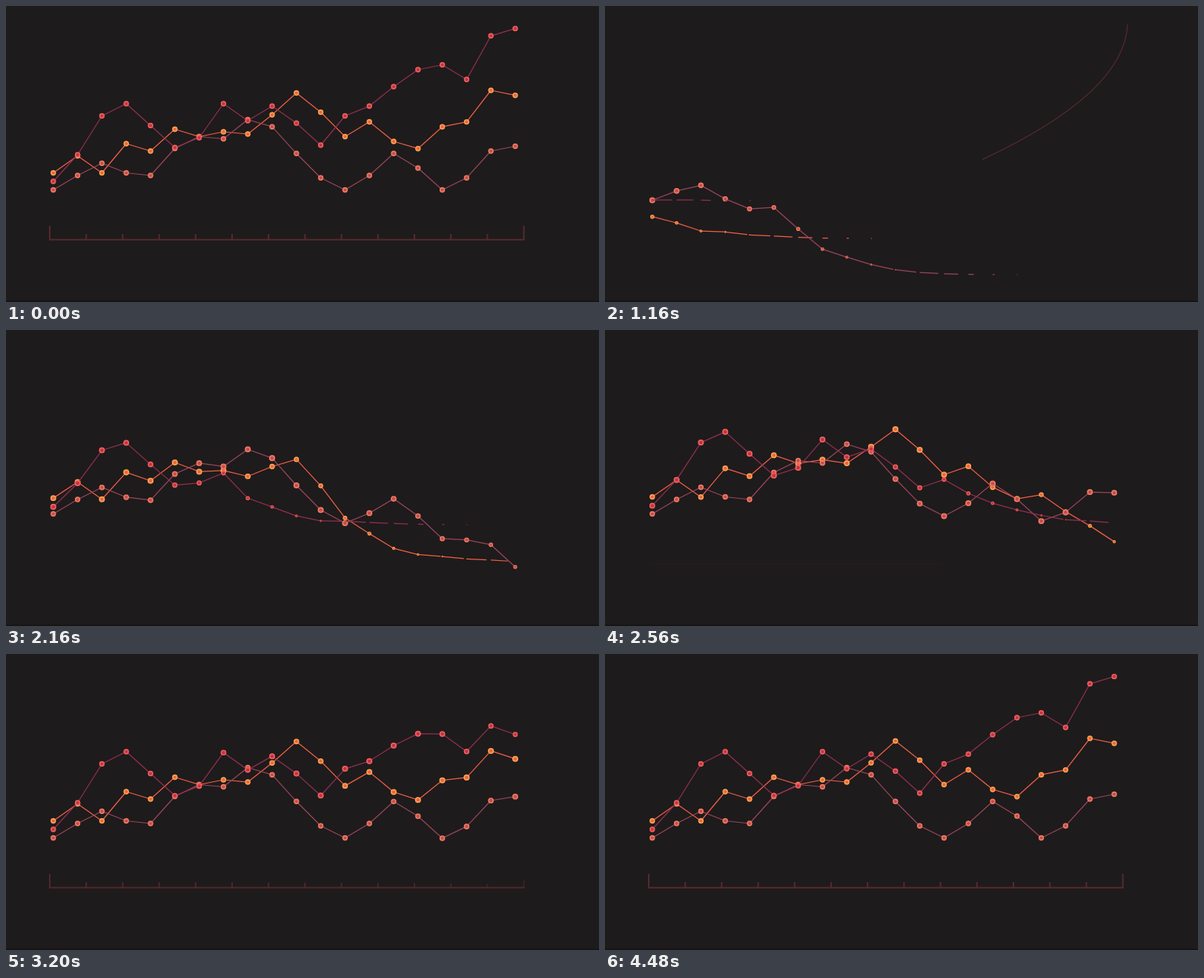
Write an HTML page that moves like this. It is 800 px wide and 400 px high and loops after 5.52 s.

```html
<!DOCTYPE html>
<html lang="en">
<head>
<meta charset="utf-8">
<title>Line chart</title>
<style>
html, body { margin: 0; width: 100%; height: 100%; overflow: hidden; background: #1e1b1c; }
svg { display: block; width: 100%; height: 100%; }
</style>
</head>
<body>
<svg id="stage" viewBox="0 0 800 400" fill="none"></svg>
<script>
const LOOP = 5520, START = 40, END = 4480;
const STEP = 80;              // delay between neighbouring points
const X0 = 63.8, DX = 32.8;
const AXIS = { x: 59, y: 315.8, w: 639.6, parts: 13, color: '#552a2f' };

const SERIES = [
  { delay: 480, base: 314, line: '#f25f47', ring: '#f9a352', core: '#f2623f',
    y: [225.5, 202.5, 225.5, 186, 196, 166.5, 176.5, 170, 173, 147,
        117.5, 143.5, 176.5, 156.5, 183, 192.7, 163.2, 156.6, 114, 120.7] },
  { delay: 0, base: 363, line: '#9a465a', ring: '#ee7b62', core: '#c44c4e',
    y: [248.5, 229, 212.5, 225.5, 229, 192.5, 176.5, 179.5, 153.5, 163.2,
        199.3, 232.2, 248.5, 229, 199.3, 219, 248.5, 232.2, 196, 189.5] },
  { delay: 840, base: 263, line: '#91304f', ring: '#ee605f', core: '#c4323f',
    y: [237, 201, 148.5, 132, 161.5, 191.3, 178, 132, 155, 135.3,
        158.3, 188, 148.5, 135.3, 109, 86, 79.5, 99.3, 40.3, 30.4] }
];

const clamp = v => Math.min(1, Math.max(0, v));
const span = (t, from, length) => clamp((t - from) / length);
const cubicOut = x => 1 - (1 - x) ** 3;
const quadInOut = x => x < 0.5 ? 2 * x * x : 1 - 2 * (1 - x) ** 2;

// cubic-bezier(.6, 0, 0, 1)
function swift(x) {
  if (x <= 0 || x >= 1) return clamp(x);
  let lo = 0, hi = 1;
  for (let i = 0; i < 22; i++) {
    const s = (lo + hi) / 2;
    if (s * (1.8 + s * (2.8 * s - 3.6)) < x) lo = s; else hi = s;
  }
  return lo * lo * (3 - 2 * lo);
}

function backOut(x) {
  const q = x - 1;
  return 1 + 2.7 * q ** 3 + 1.7 * q * q;
}

const stage = document.getElementById('stage');

function add(tag, attrs) {
  const el = document.createElementNS('http://www.w3.org/2000/svg', tag);
  set(el, attrs);
  return stage.appendChild(el);
}

function set(el, attrs) {
  for (const key in attrs) el.setAttribute(key, attrs[key]);
}

add('rect', { width: 800, height: 400, fill: '#1e1b1c' });
add('rect', { y: 398, width: 800, height: 2, fill: '#171415' });

const swoosh = add('path', {
  d: 'M59 355 Q705 193 705 21', pathLength: 1, stroke: '#592a2e', 'stroke-width': 1.2
});
const axis = add('path', { stroke: AXIS.color, 'stroke-width': 2 });
const ticks = Array.from({ length: AXIS.parts + 1 }, () =>
  add('path', { stroke: AXIS.color, 'stroke-width': 2 }));

for (const s of SERIES) {
  s.path = add('path', { stroke: s.line, 'stroke-width': 1.25 });
  s.dots = s.y.map(() => add('circle', { fill: s.core, stroke: s.ring }));
}

function drawSwoosh(t) {
  const head = cubicOut(span(t, -50, 1460));
  const tail = quadInOut(span(t, 480, 1200));
  const visible = head - tail > 0.001;
  set(swoosh, {
    visibility: visible ? 'visible' : 'hidden',
    'stroke-dasharray': Math.max(0, head - tail) + ' 2',
    'stroke-dashoffset': -tail
  });
}

function drawAxis(t) {
  const grow = swift(span(t, 2220, 900));
  const alpha = swift(span(t, 2220, 1600));
  set(axis, { d: `M${AXIS.x - 1} ${AXIS.y}h${(AXIS.w + 2) * grow}`, opacity: grow ? alpha : 0 });
  ticks.forEach((tick, i) => {
    const p = swift(span(t, 2300 + 40 * i, 1067));
    const height = i % AXIS.parts ? 7.5 : 18.8;
    const x = AXIS.x + AXIS.w * i / AXIS.parts;
    set(tick, { d: `M${x} ${AXIS.y}v${-height * p}`, opacity: p * alpha });
  });
}

function drawSeries(s, t) {
  const local = i => t - s.delay - STEP * i;
  const pts = s.y.map((y, i) => [
    X0 + DX * i,
    s.base + (y - s.base) * swift(span(local(i), 0, 2133))
  ]);
  let d = '';
  pts.forEach(([x, y], i) => {
    const size = Math.max(0, backOut(span(local(i), 264, 1867)));
    set(s.dots[i], { cx: x, cy: y, r: 2.9 * size, 'stroke-width': 1.6 * size });
    const next = pts[i + 1];
    const p = swift(span(local(i), -193, 1067));
    if (next && p > 0.01) {
      d += `M${x} ${y}L${x + (next[0] - x) * p} ${y + (next[1] - y) * p}`;
    }
  });
  set(s.path, { d });
}

function draw(time) {
  let t = time % LOOP;
  if (t < START || t >= END) t = LOOP;
  drawSwoosh(t);
  drawAxis(t);
  SERIES.forEach(s => drawSeries(s, t));
}

const began = performance.now();
function tick() {
  draw(performance.now() - began);
  requestAnimationFrame(tick);
}
tick();
</script>
</body>
</html>
```
